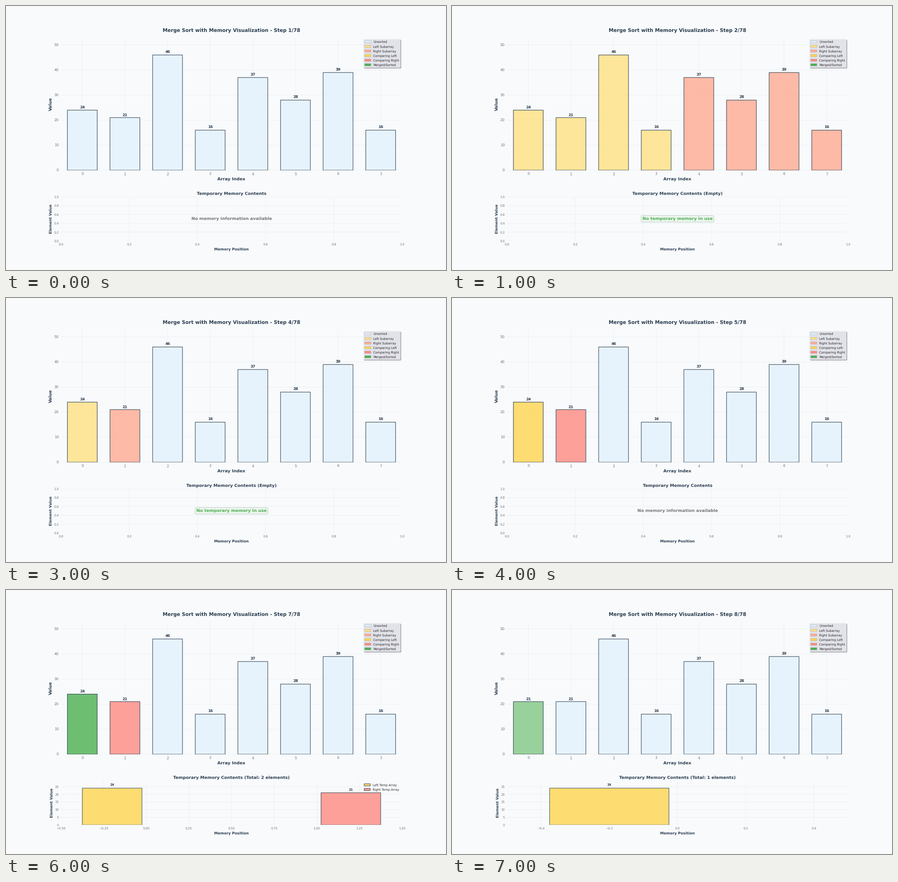
A matplotlib script for the animation above (8000 ms loop, 966x580 px).

```python
import matplotlib.pyplot as plt
import numpy as np
from matplotlib.animation import FuncAnimation
from matplotlib.patches import Patch

BG, INK, GREY, GREEN = "#F8FAFC", "#2C3E50", "#757575", "#4CAF50"
LEFT, RIGHT = "#FFD54F", "#FF8A80"

plt.rcParams.update({
    "font.family": "DejaVu Sans",
    "text.hinting": "none",
    "text.color": "#262626",
    "path.snap": False,
    "patch.linewidth": 0.3,
    "axes.facecolor": BG,
    "axes.axisbelow": True,
    "axes.labelcolor": INK,
    "axes.labelweight": "bold",
    "axes.titleweight": "bold",
    "axes.titlecolor": INK,
    "xtick.major.size": 0,
    "ytick.major.size": 0,
    "xtick.major.pad": 7,
    "ytick.major.pad": 7,
    "legend.fontsize": 10,
})

ROLES = {
    "U": "#E3F2FD",  # unsorted
    "L": "#FFE082",  # left subarray
    "R": "#FFAB91",  # right subarray
    "l": LEFT,       # comparing left
    "r": RIGHT,      # comparing right
    "M": GREEN,      # merged
    "m": "#81C784",  # just placed
}
LEGEND = zip(("Unsorted", "Left Subarray", "Right Subarray",
              "Comparing Left", "Comparing Right", "Merged/Sorted"), "ULRlrM")
HANDLES = [Patch(facecolor=ROLES[r], edgecolor=INK, label=name)
           for name, r in LEGEND]

START = [24, 21, 46, 16, 37, 28, 39, 16]
PLACED = [21] + START[1:]
BOTH, REST = [(24, "Left"), (21, "Right")], [(24, "Left")]

# array, role of each bar, temporary memory (None means unknown)
STEPS = [
    (START, "UUUUUUUU", None),
    (START, "LLLLRRRR", []),
    (START, "LLRRUUUU", []),
    (START, "LRUUUUUU", []),
    (START, "lrUUUUUU", None),
    (START, "lrUUUUUU", BOTH),
    (START, "MrUUUUUU", BOTH),
    (PLACED, "mUUUUUUU", REST),
]
TOTAL = 78

fig, (top, low) = plt.subplots(
    2, 1, figsize=(20, 12.0083), dpi=48.3, facecolor=BG,
    gridspec_kw={"height_ratios": [3, 1], "hspace": 0.3,
                 "left": 0.125, "right": 0.9, "bottom": 0.11, "top": 0.88})


def reset(ax, tick_size):
    ax.clear()
    ax.spines[:].set_visible(False)
    ax.grid(True, color="#E9ECEF", linewidth=1)
    ax.tick_params(labelsize=tick_size, labelcolor=GREY)


def draw_array(step, values, roles):
    reset(top, 12)
    top.bar(range(len(values)), values, 0.7, color=[ROLES[r] for r in roles],
            edgecolor=INK, linewidth=2, alpha=0.8)
    for i, v in enumerate(values):
        top.annotate(str(v), (i, v), (0, 3), textcoords="offset points",
                     ha="center", va="bottom", fontsize=12,
                     fontweight="bold", color=INK)
    top.set_xlim(-0.5, len(values) - 0.5)
    top.set_ylim(0, max(values) * 1.15)
    top.set_xticks(range(len(values)))
    top.set_yticks(range(0, 51, 10))
    top.set_xlabel("Array Index", fontsize=14)
    top.set_ylabel("Value", fontsize=14)
    top.set_title(f"Merge Sort with Memory Visualization - Step {step}/{TOTAL}",
                  fontsize=16, pad=20)
    top.legend(handles=HANDLES, loc="upper right", frameon=True, shadow=True,
               facecolor="#EAEAF2", edgecolor="0.8", framealpha=0.9)


def draw_note(text, color, box=None):
    low.text(0.5, 0.5, text, transform=low.transAxes, ha="center", va="center",
             fontsize=14, fontweight="bold", color=color, bbox=box)
    low.set_xlim(0, 1)
    low.set_ylim(0, 1)
    low.set_xticks(np.linspace(0, 1, 6))
    low.set_yticks(np.linspace(0, 1, 6))


def draw_slots(memory):
    for i, (v, side) in enumerate(memory):
        x = i - 0.2 if side == "Left" else i + 0.2
        low.bar(x, v, 0.35, color=LEFT if side == "Left" else RIGHT,
                edgecolor=INK, linewidth=1.8, alpha=0.8,
                label=f"{side} Temp Array")
        low.text(x, v + 1, str(v), ha="center", va="bottom", fontsize=10,
                 fontweight="bold", color=INK)
    n = len(memory)
    low.set_xticks(np.arange(-2, 7) / 4 if n > 1 else np.arange(-2, 3) / 5)
    low.set_yticks(range(0, 26, 5))
    low.set_xlim(-0.5, n - 0.5)
    low.set_ylim(0, max(v for v, _ in memory) * 1.2)
    if n > 1:
        low.legend(loc="upper right", frameon=False)


def draw_memory(memory):
    reset(low, 10)
    title = "Temporary Memory Contents"
    if memory is None:
        draw_note("No memory information available", GREY)
    elif not memory:
        title += " (Empty)"
        draw_note("No temporary memory in use", GREEN,
                  dict(boxstyle="round,pad=0.3", facecolor="#EDF6EF",
                       edgecolor="#A0BAA4", linewidth=1))
    else:
        title += f" (Total: {len(memory)} elements)"
        draw_slots(memory)
    low.set_title(title, fontsize=14, pad=6)
    low.set_xlabel("Memory Position", fontsize=12)
    low.set_ylabel("Element Value", fontsize=12)


def update(i):
    values, roles, memory = STEPS[i]
    draw_array(i + 1, values, roles)
    draw_memory(memory)
    return []


anim = FuncAnimation(fig, update, frames=len(STEPS), interval=1000,
                     init_func=lambda: update(0), repeat=True, repeat_delay=0)
plt.show()
```
